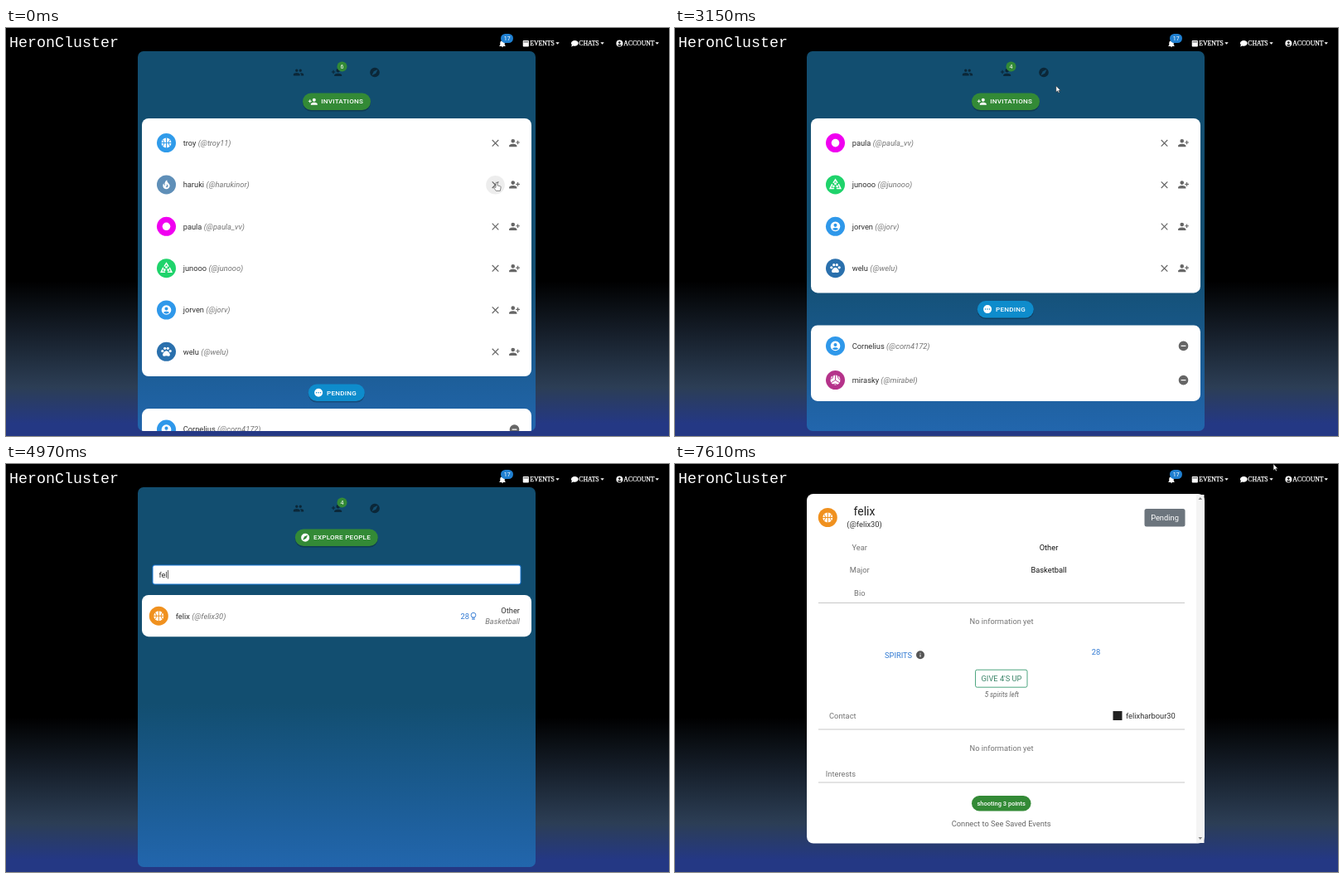
An HTML page that plays this animation: 800 px wide and 492 px high, repeating every 7640 ms.

```html
<!DOCTYPE html>
<html lang="en">
<head>
<meta charset="utf-8">
<title>HeronCluster</title>
<style>
html, body { margin: 0; width: 100%; height: 100%; overflow: hidden; background: #000; }
svg { display: block; width: 800px; height: 492px; }
text { font-family: Roboto, Arial, sans-serif; font-size: 9.3px; white-space: pre; }
.nav { font-family: "Times New Roman", "Liberation Serif", serif; font-size: 7.7px; fill: #fff; stroke: #fff; stroke-width: .25px; }
.brand { font-family: "Courier New", Courier, "Liberation Mono", monospace; font-size: 18.33px; fill: #fff; }
.caps { font-size: 8.1px; font-weight: 500; letter-spacing: .23px; fill: #fff; }
.mid { text-anchor: middle; }
.end { text-anchor: end; }
.it { font-style: italic; }
</style>
</head>
<body>
<svg viewBox="0 0 800 492">
  <defs>
    <linearGradient id="sky" x2="0" y2="1">
      <stop offset=".62" stop-color="#000"/>
      <stop offset=".88" stop-color="#2c3e55"/>
      <stop offset=".97" stop-color="#243884"/>
    </linearGradient>
    <linearGradient id="sea" x2="0" y2="1">
      <stop offset=".57" stop-color="#124e70"/>
      <stop offset="1" stop-color="#2266ad"/>
    </linearGradient>
    <clipPath id="panel"><rect x="159" y="28" width="480" height="458" rx="7"/></clipPath>
  </defs>
  <rect width="800" height="492" fill="url(#sky)"/>
  <g id="page"></g>
  <g id="nav"></g>
  <g id="cursor"></g>
</svg>
<script>
const LOOP = 7640;
const BLUE = '#2e78d2', GREEN = '#338a36', GREY = '#747474', INK = '#303030';
const $ = id => document.getElementById(id);

const DISC = 'M12 2a10 10 0 1 0 0 20a10 10 0 1 0 0-20z';
const dot = x => `M${x} 10.5a1.5 1.5 0 1 0 0 3a1.5 1.5 0 1 0 0-3z`;
const ICONS = {
  group: 'M16 11a3 3 0 1 0 0-6a3 3 0 1 0 0 6zM8 11a3 3 0 1 0 0-6a3 3 0 1 0 0 6zM8 13c-2.3 0-7 1.2-7 3.5V19h14v-2.5c0-2.3-4.7-3.5-7-3.5zM16 13l-1 .05c1.2.85 2 2 2 3.45V19h6v-2.5c0-2.3-4.7-3.5-7-3.5z',
  invite: 'M15 12a4 4 0 1 0 0-8a4 4 0 1 0 0 8zM6 10V7H4v3H1v2h3v3h2v-3h3v-2zM15 14c-2.7 0-8 1.3-8 4v2h16v-2c0-2.7-5.3-4-8-4z',
  accept: 'M9 12a4 4 0 1 0 0-8a4 4 0 1 0 0 8zM15 10v2h3v3h2v-3h3v-2h-3V7h-2v3zM1 18v2h16v-2c0-2.7-5.3-4-8-4s-8 1.3-8 4z',
  explore: DISC + 'M14.2 14.2L6 18l3.8-8.2L18 6z',
  close: 'M19 6.4L17.6 5 12 10.6 6.4 5 5 6.4l5.6 5.6L5 17.6 6.4 19l5.6-5.6 5.6 5.6 1.4-1.4-5.6-5.6z',
  remove: DISC + 'M17 13H7v-2h10z',
  pending: DISC + dot(7) + dot(12) + dot(17),
  info: DISC + 'M11 17h2v-6h-2zM11 9h2V7h-2z',
  user: DISC + 'M12 6a3.5 3.5 0 1 1 0 7a3.5 3.5 0 1 1 0-7zM12 20c-2 0-4.4-.8-6.1-2.9C7.5 15.8 9.7 15 12 15s4.5.8 6.1 2.1C16.4 19.2 14 20 12 20z',
  flame: 'M13.5 1C9 4 7 8 9 14c-2-1-3-3-3-5.5C4.5 10 4 12 4 14.4C4 19 8 22 12 22s8-3 8-8c0-5-7-6-6.5-13zM10 17.5c3-1 3-3.5 2.5-7c3 2 3.5 3.5 3.3 5c-.3 2.5-3.3 4-5.8 2z',
  bell: 'M12 22a2 2 0 0 0 2-2h-4a2 2 0 0 0 2 2zM18 16v-5c0-3-1.6-5.6-4.5-6.3V4a1.5 1.5 0 0 0-3 0v.7C7.6 5.4 6 8 6 11v5l-2 2v1h16v-1z',
  calendar: 'M3 5a2 2 0 0 1 2-2h14a2 2 0 0 1 2 2v15a2 2 0 0 1-2 2H5a2 2 0 0 1-2-2zM5 7v2h14V7z',
  bubble: 'M12 3C6 3 1 6.8 1 11.5c0 2 1 4 2.5 5.4L1 21.5c3 0 5-1 6.5-2c1.5.4 3 .6 4.5.6c6 0 11-4 11-8.6S18 3 12 3z'
};
const icon = (name, x, y, size, fill) =>
  `<path d="${ICONS[name]}" fill="${fill}" fill-rule="evenodd" transform="translate(${x - size / 2} ${y - size / 2}) scale(${size / 24})"/>`;
const rect = (x, y, w, h, fill, r = 0, more = '') =>
  `<rect x="${x}" y="${y}" width="${w}" height="${h}" rx="${r}" fill="${fill}" ${more}/>`;
const circle = (x, y, r, fill, more = '') => `<circle cx="${x}" cy="${y}" r="${r}" fill="${fill}" ${more}/>`;
const line = (d, stroke, w = 1) => `<path d="${d}" fill="none" stroke="${stroke}" stroke-width="${w}" stroke-linecap="round"/>`;
// y is the middle of the capitals
const text = (x, y, s, fill = INK, cls = '', size = 9.3) =>
  `<text x="${x}" y="${y + size * .355}" fill="${fill}" class="${cls}" style="font-size:${size}px">${s}</text>`;

const GLYPHS = {
  ball: circle(0, 0, 6, '#fff') + line('M-6 0H6M0-6V6M-4.5-4Q-.8 0-4.5 4M4.5-4Q.8 0 4.5 4', 'currentColor', 1),
  flame: icon('flame', 0, 0, 12.5, '#fff'),
  round: circle(0, 0, 4.8, '#fff'),
  user: icon('user', 0, 0, 14, '#fff'),
  cycle: line('M-2.3-2.5L0-6L2.3-2.5M4-.3L6.3 4.5H2M-4-.3L-6.3 4.5H-2', '#fff', 1.5) +
    [[0, -1.2], [-2.2, 2], [2.2, 2]].map(p => circle(...p, 1.4, '#fff')).join(''),
  paw: [[-4.7, -.8], [-1.8, -4], [1.8, -4], [4.7, -.8]].map(p => circle(...p, 1.6, '#fff')).join('') +
    '<path d="M0-1C2-1 5 2.5 4.3 4.3C3.5 6 1.5 5 0 5S-3.5 6-4.3 4.3C-5 2.5-2-1 0-1z" fill="#fff"/>',
  volley: circle(0, 0, 6, '#fff') + line('M0 0V-6M0 0L5 3.2M0 0L-5 3.2M2.5-5.5Q3-1 5.8 0M-5.8-1Q-2.5-1.5-2.5-5.5M-2.8 5Q.5 3.5 2.5 5.5', 'currentColor', .9),
  flower: [0, 1, 2, 3, 4].map(i => circle(2.6 * Math.sin(i * 1.257), -1.6 - 2.6 * Math.cos(i * 1.257), 1.7, '#fff')).join('') +
    circle(0, -1.6, 1.2, 'currentColor') + line('M0 2.8V6M-4 3Q-3 6 0 6Q3 6 4 3', '#fff', 1.4),
  tower: line('M0-2L-3 6M0-2L3 6M-1.7 3H1.7M-2.5-4.5Q-4-2-2.5.5M2.5-4.5Q4-2 2.5.5M-4.7-6Q-7-2-4.7 2M4.7-6Q7-2 4.7 2', '#fff', 1) + circle(0, -2, 1.2, '#fff'),
  racket: '<ellipse cx="1.5" cy="-2" rx="3" ry="4" transform="rotate(40)" fill="none" stroke="#fff" stroke-width="1.2"/>' + line('M-.5 2L-5 6', '#fff', 1.4) + circle(4, 4.2, 1.4, '#fff'),
  walker: circle(0, -5, 1.5, '#fff') + line('M0-2.5L-.5 1.5L-2.5 6M-.5 1.5L2 3L2.3 6M-3 1L-2.3-1.5L0-2.5L2.5 0M4 0V6', '#fff', 1.3),
  coach: circle(-1.5, -2.5, 2.4, '#fff') + '<path d="M-6.5 5.5Q-6.5 1.5-1.5 1.5T3.5 5.5z" fill="#fff"/>' + line('M-4.5-4H2.5M5-5V-1.5M5 .5V1', '#fff', 1.3)
};
const avatar = (x, y, color, glyph) =>
  `<g transform="translate(${x} ${y})" color="${color}">${circle(0, 0, 11.5, color)}${GLYPHS[glyph]}</g>`;
const person = (x, y, nick, handle) =>
  text(x, y, `${nick} <tspan class="it" fill="${GREY}">(@${handle})</tspan>`);

const INVITES = [
  ['#2f9bea', 'ball', 'troy', 'troy11'],
  ['#5f8fb8', 'flame', 'haruki', 'harukinor'],
  ['#f000f0', 'round', 'paula', 'paula_vv'],
  ['#1fd36b', 'cycle', 'junooo', 'junooo'],
  ['#2f98ea', 'user', 'jorven', 'jorv'],
  ['#2a70ad', 'paw', 'welu', 'welu']
];
const WAITING = [
  ['#2f98ea', 'user', 'Cornelius', 'corn4172'],
  ['#b5338a', 'volley', 'mirasky', 'mirabel']
];
// colour, glyph, nickname, handle, spirits, left edge of right column, year, major
const PEOPLE = [
  ['#3478dc', 'round', 'tom', 'tom', 48, 571, '4th - Senior', 'Data Theory'],
  ['#5cf0a0', 'flower', 'clara', 'clara12', 20, 550.5, '2nd - Sophomore', 'Biochem'],
  ['#d4a420', 'tower', 'weluevents', 'weluevents', 56, 620, '', ''],
  ['#2b8de0', 'user', 'Cornelius', 'corn4172', 4, 620, '', ''],
  ['#2a2ad8', 'racket', 'sophie', 'sophie12', 8, 559.5, '1st - Freshman', 'psychology'],
  ['#2a2ad8', 'walker', 'dozer', 'dzdzzz', 20, 574, '4th - Senior', 'MeEg'],
  ['#c2268f', 'coach', 'logan123', 'loganooo', 0, 533, '4th - Senior', 'Electrical Engineering'],
  ['#b5338a', 'volley', 'mirasky', 'mirabel', 16, 574, '3rd - Junior', 'MIMG'],
  ['#f0911f', 'ball', 'felix', 'felix30', 28, 578, 'Other', 'Basketball']
];

function pill(x, y, w, color, name, label) {
  return rect(x, y + 1.5, w, 20.5, '#000', 10, 'opacity=".25"') + rect(x, y, w, 20.5, color, 10.2) +
    icon(name, x + 12.3, y + 10.2, 12, '#fff') + text(x + 22.3, y + 10.1, label, '#fff', 'caps', 8.1);
}

function panel(count, body) {
  const dark = '#0b2738';
  return `<g clip-path="url(#panel)">${rect(159, 28, 480, 458, 'url(#sea)')}` +
    icon('group', 353, 53.5, 13.5, dark) + icon('invite', 399, 53.5, 13.5, dark) + icon('explore', 445, 53.5, 14, dark) +
    circle(405.5, 46.5, 6, GREEN) + text(405.5, 46.5, count, '#fff', 'mid', 7) + body + '</g>';
}

const PITCH = 50.35;
function invitesPage(n) {
  const bottom = 118 + PITCH * n;
  let s = pill(358, 78.5, 82, GREEN, 'invite', 'INVITATIONS') + rect(164, 109, 470, bottom - 109, '#fff', 8);
  INVITES.slice(6 - n).forEach(([color, glyph, nick, handle], i) => {
    const y = 138.6 + PITCH * i;
    s += rect(173, y - 25.2, 452, PITCH, '#f8f8f8', 0, 'class="row" opacity="0"') +
      circle(590.5, y + .3, 11.3, '#ededed', 'class="halo" opacity="0"') +
      avatar(193.5, y, color, glyph) + person(213.7, y, nick, handle) +
      icon('close', 590.5, y + .2, 14.5, '#666') + icon('accept', 613.5, y, 14, '#666');
  });
  s += pill(364.8, bottom + 9.5, 68, '#0e8ccc', 'pending', 'PENDING') + rect(164, bottom + 39, 470, 91.5, '#fff', 8);
  WAITING.forEach(([color, glyph, nick, handle], i) => {
    const y = bottom + 64 + 41.2 * i;
    s += avatar(193.5, y, color, glyph) + person(213.7, y, nick, handle) + icon('remove', 613.5, y, 14, '#666');
  });
  return panel(n, s);
}

const bulb = (x, y) => circle(x, y - 1, 2.9, 'none', `stroke="${BLUE}" stroke-width=".9"`) +
  line(`M${x - 1.4} ${y + 2.7}h2.8M${x - 1.4} ${y + 4}h2.8`, BLUE, .9);

const pen = document.createElement('canvas').getContext('2d');
function explorePage(query, focus, caret) {
  const found = PEOPLE.filter(p => [p[2], p[3], p[6], p[7]].join(' ').toLowerCase().includes(query));
  let s = pill(348.8, 78.5, 100, GREEN, 'explore', 'EXPLORE PEOPLE');
  if (focus) s += rect(176.5, 121.5, 445, 24, '#1976d2', 3);
  s += rect(177.5, 122.5, 443, 22, '#fff', 2);
  s += query ? text(184.5, 133.3, query)
    : text(184.5, 133.3, 'Search people by nickname, username, major, year ...', GREY);
  if (caret) {
    pen.font = '9.3px Roboto, Arial, sans-serif';
    s += rect(184.8 + pen.measureText(query).width, 128, .7, 10.5, '#222');
  }
  s += rect(164, 158, 470, 9 + 41.2 * found.length, '#fff', 8);
  found.forEach(([color, glyph, nick, handle, spirits, x, year, major], i) => {
    const y = 183.2 + 41.2 * i;
    s += avatar(184.3, y, color, glyph) + person(204.7, y, nick, handle) +
      text(620, y - 7, year, INK, 'end') + text(620, y + 6.8, major, GREY, 'end it');
    if (spirits) s += text(x - 19, y, spirits, BLUE, 'end') + bulb(x - 14, y);
  });
  return panel(4, s);
}

function profilePage(pending) {
  const rule = y => rect(173, y, 442, 1, '#c8c8c8');
  const none = y => text(394, y, 'No information yet', GREY, 'mid');
  return rect(159, 36, 480, 421.5, '#fff', 8) + rect(629, 37, 9.5, 420, '#f4f4f4') +
    '<path d="M631.5 43l2.3-3 2.3 3zM631.5 450l2.3 3 2.3-3z" fill="#8a8a8a"/>' +
    avatar(184.3, 64.5, '#f0911f', 'ball') +
    text(228.5, 57.5, 'felix', '#222', 'mid', 14) + text(228.5, 73, '(@felix30)', INK, 'mid') +
    rect(566.5, 54, 49, 21.5, pending ? '#6c757d' : '#198754', 2.5) +
    text(591, 64.7, pending ? 'Pending' : 'Connect', '#fff', 'mid') +
    text(222.8, 100.3, 'Year', GREY, 'mid') + text(451, 100.3, 'Other', '#111', 'mid') +
    text(222.8, 128, 'Major', GREY, 'mid') + text(451, 128, 'Basketball', '#111', 'mid') +
    text(222.8, 155.5, 'Bio', GREY, 'mid') + rule(167) + none(190) +
    text(253, 230.2, 'SPIRITS', BLUE) + icon('info', 296, 230.2, 12, '#555') + text(508, 227, '28', BLUE, 'mid') +
    rect(362.5, 248.2, 62.5, 21, '#fff', 2, 'stroke="#3a9c72" stroke-width=".9"') +
    text(394, 258.7, "GIVE 4'S UP", '#3a8468', 'mid') + text(394.3, 277.8, '5 spirits left', '#666', 'mid it', 8.1) +
    text(202.3, 303.5, 'Contact', GREY, 'mid') + rect(528.5, 298, 11, 11, '#222') + text(544, 303.5, 'felixharbour30') +
    rule(319.5) + none(342.5) + text(181.8, 373.5, 'Interests', GREY) + rule(383.5) +
    rect(358, 400, 71.5, 18.5, GREEN, 9.2) +
    `<g font-weight="500">${text(393.7, 409.2, 'shooting 3 points', '#fff', 'mid', 7.5)}</g>` +
    text(393.7, 433.5, 'Connect to See Saved Events', '#666', 'mid');
}

const menu = (name, x, label, caret) => icon(name, x, 18.5, 9.5, '#fff') +
  `<text class="nav" x="${x + 5}" y="21.2">${label}</text><path d="M${caret - 2.2} 17.3h4.4l-2.2 2.4z" fill="#fff"/>`;
$('nav').innerHTML = '<text class="brand" x="4" y="22.7">HeronCluster</text>' +
  icon('bell', 599, 18.7, 11, '#fff') + rect(597, 7, 15, 11, '#1f7fd0', 5.5) + text(604.7, 12.6, '17', '#fff', 'mid', 7) +
  menu('calendar', 627.3, 'EVENTS', 665.5) + menu('bubble', 686.3, 'CHATS', 719.5) + menu('user', 740.3, 'ACCOUNT', 785.7);

const CURSORS = {
  arrow: '<path d="M0 0V7.5L1.8 6L3 8.5L4.2 8L3 5.5H5.3z" fill="#fff" stroke="#222" stroke-width=".5"/>',
  hand: '<path d="M-1 .8Q0-.6 1 .8V4L4.6 5Q5.3 5.3 5 7L4.3 10.5H-.7L-3.3 7Q-3.3 5.6-1 6.5z" fill="#fff" stroke="#555" stroke-width=".7"/>',
  none: ''
};
// time, tip x, tip y, pointer until the next stop
const PATH = [
  [0, 592, 186, 'hand'], [380, 592, 138, 'hand'], [1150, 592, 138, 'hand'], [1420, 592, 188, 'hand'],
  [1620, 592, 186, 'hand'], [1790, 592, 151, 'hand'], [1900, 592, 138, 'hand'], [2330, 592, 138, 'arrow'],
  [3150, 460, 70, 'arrow'], [3240, 446, 54, 'hand'], [3500, 446, 54, 'arrow'], [3800, 425, 125, 'none'],
  [5150, 440, 140, 'arrow'], [5450, 490, 184, 'hand'], [6040, 490, 184, 'arrow'], [6240, 514, 138, 'arrow'],
  [6700, 590, 65, 'hand'], [7250, 590, 65, 'arrow'], [7610, 722, 0, 'arrow'], [LOOP, 724, 0, 'arrow']
];
function pointer(t) {
  let i = 0;
  while (i < PATH.length - 2 && t >= PATH[i + 1][0]) i++;
  const [a, b] = [PATH[i], PATH[i + 1]];
  const k = Math.max(0, (t - a[0]) / (b[0] - a[0]));
  return { x: a[1] + (b[1] - a[1]) * k, y: a[2] + (b[2] - a[2]) * k, kind: a[3] };
}

// cubic-bezier(.25, .1, .25, 1)
function ease(p) {
  if (p <= 0) return 0;
  if (p >= 1) return 1;
  const curve = (u, a, b) => 3 * u * (1 - u) ** 2 * a + 3 * u * u * (1 - u) * b + u ** 3;
  let lo = 0, hi = 1;
  for (let i = 0; i < 20; i++) {
    const u = (lo + hi) / 2;
    curve(u, .25, .25) < p ? lo = u : hi = u;
  }
  return curve(lo, .1, 1);
}

const EXPLORE = 3335, PROFILE = 6050, ENTER = 1000, FOCUS = 4450, KEYS = [4640, 4780, 4920];
const cache = {};
let shown = '';
function show(key, make) {
  if (key === shown) return;
  shown = key;
  $('page').innerHTML = cache[key] ??= make();
}

function hover(t) {
  const past = [0, 1, 2, 3, 4].map(k => pointer(Math.max(0, t - k * 35)));
  const now = past[0];
  document.querySelectorAll('.row').forEach((row, i) => {
    const hits = past.filter(p => p.x < 625 && p.x > 173 && Math.floor((p.y - 113.4) / PITCH) === i);
    row.setAttribute('opacity', t < 150 ? 0 : hits.length / past.length);
  });
  document.querySelectorAll('.halo').forEach((halo, i) => {
    const near = Math.hypot(now.x - 590.5, now.y - 138.6 - PITCH * i) < 11.5;
    halo.setAttribute('opacity', near ? 1 : 0);
  });
}

let kind = '';
function render(t) {
  let enter = 1;
  if (t < EXPLORE) {
    const n = t < 1000 ? 6 : t < 2150 ? 5 : 4;
    show('invites' + n, () => invitesPage(n));
    hover(t);
  } else if (t < PROFILE) {
    const query = 'fel'.slice(0, KEYS.filter(k => t >= k).length);
    const focus = t >= FOCUS;
    const caret = focus && (t < KEYS[2] || Math.floor((t - KEYS[2]) / 500) % 2 === 0);
    show(['explore', query, focus, caret].join(), () => explorePage(query, focus, caret));
    enter = ease((t - EXPLORE) / ENTER);
  } else {
    const pending = t >= 7080;
    show('profile' + pending, () => profilePage(pending));
    enter = ease((t - PROFILE) / ENTER);
  }
  $('page').setAttribute('transform', `translate(0 ${100 * (1 - enter)})`);
  $('page').setAttribute('opacity', enter ** 1.2);

  const p = pointer(t);
  if (p.kind !== kind) $('cursor').innerHTML = CURSORS[kind = p.kind];
  $('cursor').setAttribute('transform', `translate(${p.x} ${p.y})`);
}

const start = performance.now();
function tick() {
  render((performance.now() - start) % LOOP);
  requestAnimationFrame(tick);
}
tick();
</script>
</body>
</html>
```
